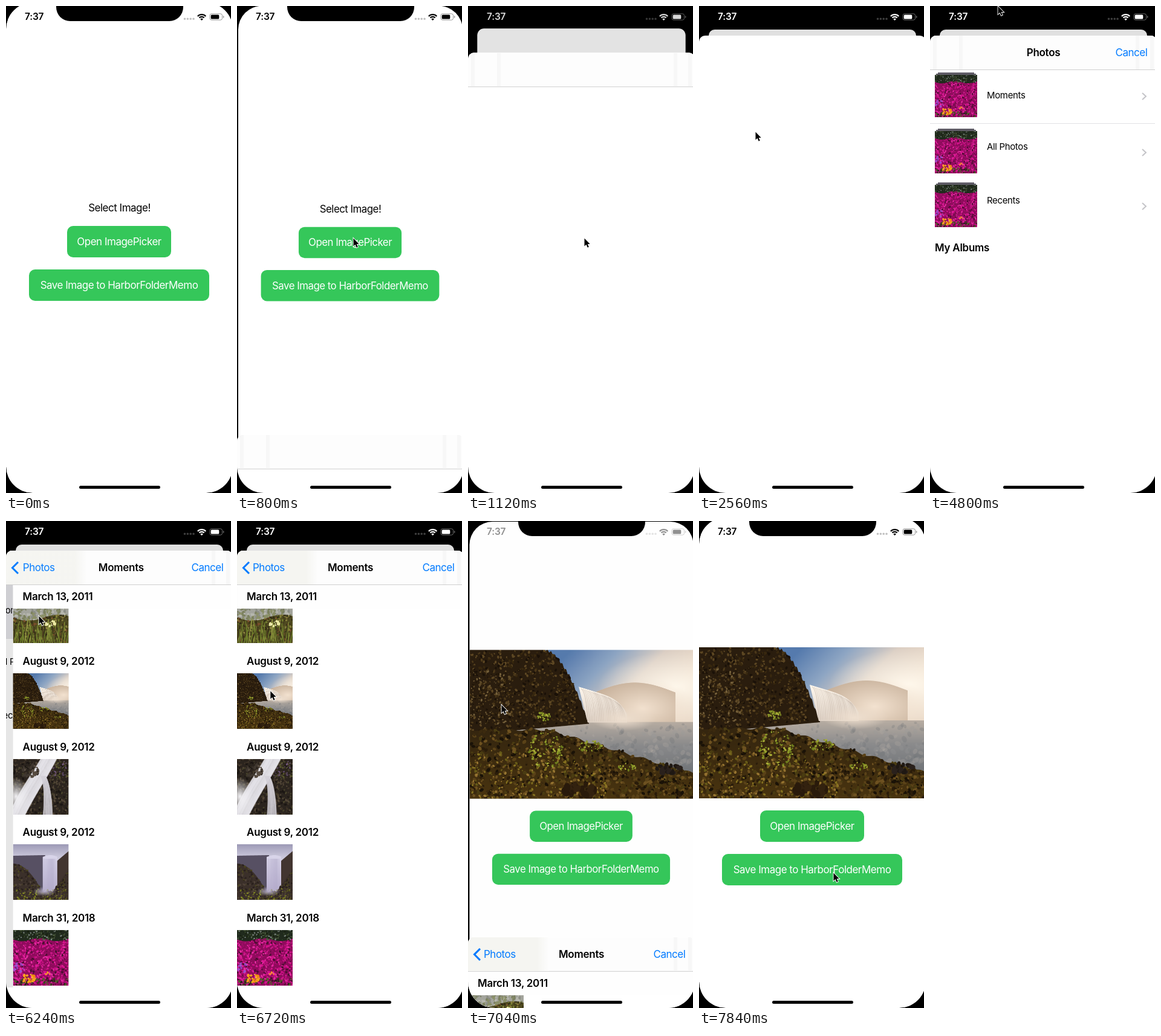
An HTML page with a canvas that plays this animation: 372x806 px, repeating every 8 s.

```html
<!DOCTYPE html>
<html lang="en">
<head>
<meta charset="utf-8">
<title>Image picker</title>
<style>
html, body { margin: 0; width: 100%; height: 100%; overflow: hidden; background: #000; }
body { position: relative; font: 17px/24px Inter, sans-serif; letter-spacing: -.5px; color: #000; }
div, svg, canvas { position: absolute; }
canvas { object-fit: cover; }
#screen { left: 0; top: -6px; width: 375px; height: 812px; border-radius: 44px; overflow: hidden; }
#stage { left: 0; top: 6px; width: 375px; height: 806px; }
#card { left: 0; top: -6px; width: 375px; height: 812px; background: #fff; overflow: hidden; transform-origin: 187.5px 529px; }
#cardDim, #rootDim { inset: 0; background: #000; }
#sheet { left: 0; top: 0; width: 375px; height: 812px; background: #fff; border-radius: 10px 10px 0 0; overflow: hidden; }
#nav { left: 0; top: 0; width: 375px; height: 55.5px; background: #fdfdfd; border-bottom: 1px solid #cfcfcf; overflow: hidden; }
.band { top: 0; width: 6px; height: 56px; background: #f7f7f7; }
#tint { left: 0; top: 0; width: 134px; height: 56px; background: linear-gradient(90deg, #f5f5f1 85%, #fdfdfd); }
#root, #moments { left: 0; top: 56px; width: 375px; background: #fff; }
#root { height: 667px; overflow: hidden; }
#moments { height: 710px; }
#rowHit { left: 0; top: 0; width: 375px; height: 89px; background: #e5e5ea; }
.rule { left: 0; top: 89px; width: 375px; height: 1px; background: #e2e2e4; }
.stack { height: 1.5px; background: #5f5c66; }
.sticky { left: 0; top: 0; width: 375px; height: 40px; background: #fefefe; }
.t { white-space: nowrap; height: 24px; }
.c { transform: translateX(-50%); }
.b { font-weight: 600; letter-spacing: -.27px; }
.s { font-size: 15px; letter-spacing: -.35px; }
.blue { color: #007aff; }
.btn { height: 52px; line-height: 52px; border-radius: 10px; background: #35c75a; color: #fff; text-align: center; white-space: nowrap; }
#time { left: 31px; top: 6px; font-weight: 600; font-size: 15.5px; letter-spacing: -.2px; }
#status, #notch, #cursor { left: 0; top: 0; overflow: visible; }
#notch { left: 83px; top: -25px; width: 209.5px; height: 50px; border-radius: 23px; background: #000; }
#home { left: 121px; top: 794px; width: 133.5px; height: 5px; border-radius: 3px; background: #000; }
</style>
</head>
<body>
<div id="screen"><div id="stage"></div></div>
<script>
const DURATION = 8000, STEP = 160, SHEET_TOP = 49, SHEET_TRAVEL = 757;
const PRESENT = 756, LOADED = 4800, PUSH = 5860, DISMISS = 6802;
const $ = id => document.getElementById(id);
const clamp = v => Math.min(1, Math.max(0, v));
const mix = (a, b, k) => a + (b - a) * k;
const ramp = (v, from, to) => clamp((v - from) / (to - from));
const times = (n, fn) => Array.from({ length: n }, (_, i) => fn(i));

// Photo painting: regions are bounded by functions of x
function painter(ctx, seed) {
  const rnd = () => (seed = seed * 16807 % 2147483647) / 2147483647;
  const asFn = v => typeof v === 'function' ? v : () => v;
  const p = {
    rnd,
    fade(colors, x0, y0, x1, y1) {
      const g = ctx.createLinearGradient(x0, y0, x1, y1);
      colors.forEach((c, i) => g.addColorStop(i / (colors.length - 1), c));
      return g;
    },
    area(x0, x1, top, bottom, fill) {
      ctx.fillStyle = fill;
      ctx.beginPath();
      for (let x = x0; x <= x1; x++) ctx.lineTo(x, asFn(top)(x));
      for (let x = x1; x >= x0; x--) ctx.lineTo(x, asFn(bottom)(x));
      ctx.fill();
    },
    dabs(count, x0, x1, top, bottom, size, colors) {
      for (let i = 0; i < count; i++) {
        const x = mix(x0, x1, rnd()), y = mix(asFn(top)(x), asFn(bottom)(x), rnd());
        const r = size * mix(.4, 1.2, rnd());
        ctx.fillStyle = colors[Math.floor(rnd() * colors.length)];
        ctx.beginPath();
        ctx.ellipse(x, y, r, r * .7, rnd() * 3, 0, 7);
        ctx.fill();
      }
    },
    cluster(count, cx, cy, rx, ry, size, colors) {
      const h = x => ry * Math.sqrt(Math.max(0, 1 - ((x - cx) / rx) ** 2));
      p.dabs(count, cx - rx, cx + rx, x => cy - h(x), x => cy + h(x), size, colors);
    },
    glow(x, y, rx, ry, color) {
      ctx.save();
      ctx.translate(x, y);
      ctx.scale(rx, ry);
      const g = ctx.createRadialGradient(0, 0, 0, 0, 0, 1);
      g.addColorStop(0, color);
      g.addColorStop(1, color + '00');
      ctx.fillStyle = g;
      ctx.fillRect(-1, -1, 2, 2);
      ctx.restore();
    },
    strands(count, color, curve) {
      ctx.strokeStyle = color;
      for (let i = 0; i < count; i++) {
        ctx.lineWidth = mix(.6, 2, rnd());
        ctx.beginPath();
        curve(i / count);
        ctx.stroke();
      }
    }
  };
  return p;
}

const leaf = ['#8d9929', '#6f7d1d', '#a7ac36'];
const scenes = {
  falls: { w: 375, h: 250, seed: 7, paint(c, p) {
    p.area(0, 375, 0, 250, p.fade(['#557aad', '#8da5c3', '#dccfc4', '#ecdccb'], 170, 0, 290, 120));
    p.glow(345, 62, 130, 60, '#fff8ec');
    p.area(208, 345, x => 72 - 17 * Math.sin((x - 208) / 44), 122, '#c8b29c');
    p.glow(290, 98, 90, 50, '#f3e2d0');
    p.area(0, 375, 121, 250, p.fade(['#b9aea3', '#8b8b8c', '#74777b'], 0, 120, 0, 200));
    p.dabs(180, 160, 375, 125, 195, 5, ['#9a9a9a44', '#6b6f7444', '#b3aca444']);
    const cliff = x => x < 125 ? 0 : 125 * ((x - 125) / 75) ** 1.8 + 2 * Math.sin(x);
    p.area(0, 200, cliff, x => 142 - x * .09, '#2a1d0e');
    p.dabs(900, 0, 180, cliff, x => 138 - x * .09, 2.4, ['#4a3719', '#38280f', '#1a1108', '#5d4723', '#2a1d0e']);
    p.dabs(160, 0, 70, 35, 125, 2, ['#75603a', '#5d4928', '#211608']);
    const crest = x => 62 + .3 * (x - 183) + 22 * ((x - 183) / 81) ** 6;
    p.area(183, 264, crest, x => Math.min(122, 62 + (x - 183) * 4), p.fade(['#fff8ee', '#dfd2c6'], 0, 62, 0, 122));
    p.strands(22, '#b8a99a66', k => {
      const x = 187 + 66 * k;
      c.moveTo(x, crest(x) + 2);
      c.quadraticCurveTo(x + 9, crest(x) + 8, x + 11, 120);
    });
    p.glow(258, 116, 55, 20, '#efe0d0');
    const shore = x => 134 + Math.max(0, x - 130) * .3 + 2 * Math.sin(x / 6);
    p.area(0, 375, shore, 250, p.fade(['#35260f', '#49340f'], 0, 140, 0, 250));
    p.dabs(1100, 0, 375, shore, 250, 3.4, ['#5a4218', '#2a1c0a', '#6d5120', '#3b2a0f', '#1a1207', '#4a3c12']);
    p.dabs(260, 0, 230, x => shore(x) + 35, 250, 2.4, ['#84701f', '#665a18', '#957330']);
    p.cluster(22, 333, 200, 20, 8, 6, ['#2a211c', '#1f1813']);
    p.cluster(26, 185, 236, 26, 12, 7, ['#33220f', '#291a0b']);
    p.cluster(80, 128, 168, 28, 30, 2.2, leaf);
    p.cluster(35, 125, 112, 11, 8, 2.3, leaf);
    p.cluster(40, 202, 162, 20, 10, 2, leaf);
    p.cluster(24, 264, 197, 14, 7, 2, leaf);
  } },
  flowers: { w: 70, h: 70, seed: 5, paint(c, p) {
    p.area(0, 70, 0, 70, '#8f0b5c');
    p.dabs(750, 0, 70, 12, 70, 1.5, ['#d8128e', '#c2107f', '#e62ba2', '#a00d68', '#4a0f30', '#dd1c98']);
    p.area(0, 70, 0, x => 12 + 2 * Math.sin(x / 7), '#202a1d');
    p.dabs(140, 0, 70, 0, 12, 1.2, ['#4b5a3f', '#848d8b', '#18200f', '#39472b']);
    p.dabs(70, 0, 70, 61, 70, 1.6, ['#39451d', '#29231b', '#55602b']);
    p.cluster(22, 7, 48, 7, 7, 1.5, ['#a252d2', '#8b40b8']);
    p.cluster(26, 20, 61, 8, 6, 2, ['#ffa51c', '#f08a10', '#ffc03a']);
    p.cluster(5, 43, 55, 3, 2, 1.5, ['#ffa51c']);
  } },
  grass: { w: 92, h: 92, seed: 11, paint(c, p) {
    p.area(0, 92, 0, 92, '#a3a49c');
    p.dabs(200, 0, 92, 30, 60, 3, ['#8c8e86', '#b6b7ae', '#7c8160', '#8b9068']);
    const turf = x => 50 + 5 * Math.sin(x / 16);
    p.area(0, 92, turf, 92, '#4f4a20');
    p.dabs(350, 0, 92, turf, 92, 1.8, ['#6f7a2c', '#3e3518', '#8c8440', '#2f2a16', '#7a4e2c']);
    for (const color of ['#8f9440', '#332b16', '#6b7a2a'])
      p.strands(24, color, k => {
        c.moveTo(92 * k, 92);
        c.lineTo(92 * k + mix(-7, 7, p.rnd()), mix(52, 80, p.rnd()));
      });
    p.cluster(18, 62, 60, 8, 5, 2.5, ['#eceaa4', '#f5f2c4']);
  } },
  stream: { w: 92, h: 92, seed: 14, paint(c, p) {
    p.area(0, 92, 0, 92, '#2b241e');
    p.dabs(500, 0, 92, 0, 92, 2.2, ['#3f3428', '#1b1613', '#524637', '#45402a']);
    p.dabs(70, 45, 92, 4, 32, 1.6, ['#765a83', '#5d4a66', '#5a5c2c']);
    p.strands(60, '#e8e6ecaa', k => {
      c.moveTo(46 + 26 * k, 0);
      c.bezierCurveTo(28 + 28 * k, 32, 30 * k + 14, 45, 26 * k - 6, 92);
    });
    p.strands(22, '#d5d2daaa', k => {
      c.moveTo(46 + 8 * k, 28);
      c.quadraticCurveTo(54 + 10 * k, 45, 50 + 16 * k, 92);
    });
    p.cluster(50, 29, 20, 13, 11, 3, ['#3f372f', '#574c41', '#2b241e']);
    p.glow(5, 62, 22, 32, '#f3f2f5');
  } },
  gorge: { w: 92, h: 92, seed: 16, paint(c, p) {
    p.area(0, 92, 0, 92, p.fade(['#9d9ab6', '#c9c6da', '#dcdae6'], 0, 0, 0, 40));
    p.area(0, 53, x => 19 - x * .02, 92, '#575063');
    p.area(70, 92, x => 30 - (x - 70) * .85, 92, '#423530');
    p.area(49, 73, x => 21 - Math.sin((x - 49) / 8) * 3, 78, p.fade(['#d9d5ea', '#bcb3d2'], 0, 20, 0, 78));
    p.strands(12, '#a79fc166', k => { c.moveTo(51 + 20 * k, 24); c.lineTo(50 + 22 * k, 76); });
    const bank = x => x < 48 ? 32 + x * x * .02 : 78 - Math.max(0, x - 66) * 1.4;
    p.area(0, 92, bank, 92, '#3b302a');
    p.dabs(400, 0, 92, bank, 92, 1.9, ['#4a4420', '#2a211d', '#4f4238', '#352b27']);
    p.dabs(60, 5, 92, 74, 92, 1.6, ['#717420', '#858b25']);
    p.glow(52, 78, 20, 8, '#b8b0cc');
  } }
};

// Markup helpers
const text = (x, cy, str, cls = '', id = '') =>
  `<div ${id && `id="${id}"`} class="t ${cls}" style="left:${x}px;top:${cy - 12}px">${str}</div>`;
const box = (cls, x, y, w, inner = '') =>
  `<div class="${cls}" style="left:${x}px;top:${y}px;width:${w}px">${inner}</div>`;
const photo = (name, x, y, w, h) =>
  `<canvas data-scene="${name}" style="left:${x}px;top:${y}px;width:${w}px;height:${h}px"></canvas>`;
const chevron = (x, cy, w, h, color, weight) =>
  `<svg style="left:${x}px;top:${cy - h / 2}px;overflow:visible" width="12" height="${h}"><path d="M0 0l${w} ${h / 2}l${-w} ${h / 2}" fill="none" stroke="${color}" stroke-width="${weight}"/></svg>`;

const albumRow = (name, y, labelY) =>
  box('stack', 13, y, 60) + box('stack', 10, y + 2, 66) + photo('flowers', 8, y + 4, 70, 70) +
  text(94, y + labelY, name, 's') + chevron(351, y + 39, 6, 11, '#c4c4c8', 2);

function section(scene, i) {
  const y = 5 + 141.75 * i;
  const date = i === 0 ? 'March 13, 2011' : i < 4 ? 'August 9, 2012' : 'March 31, 2018';
  return photo(scene, 0, y, 92, 92) +
    (i ? text(16, y - 20, date, 'b') : `<div class="sticky">${text(16, 20, date, 'b')}</div>`);
}

$('stage').innerHTML = `
<div id="card">
  ${text(187.5, 340, 'Select Image!', 'c', 'prompt')}
  <div id="picked">${photo('falls', 0, 215, 375, 250)}</div>
  <div id="buttons">
    ${box('btn', 101, 370, 172, 'Open ImagePicker')}
    ${box('btn', 38, 442, 298, 'Save Image to HarborFolderMemo')}
  </div>
  <div id="cardDim"></div>
</div>
<div id="sheet">
  <div id="root">
    <div id="rowHit"></div>
    <div class="rule"></div>
    ${albumRow('Moments', 5, 38)}
    ${albumRow('All Photos', 98, 30)}
    ${albumRow('Recents', 187, 30)}
    ${text(8, 295, 'My Albums', 'b')}
    <div id="rootDim"></div>
  </div>
  <div id="moments">${['grass', 'falls', 'stream', 'gorge', 'flowers'].map(section).join('')}</div>
  <div id="nav">
    ${[5, 48, 340, 364].map(x => `<div class="band" style="left:${x}px"></div>`).join('')}
    <div id="tint"></div>
    <div id="labels">
      ${text(187.5, 28, 'Photos', 'b c', 'rootTitle')}
      ${text(187.5, 28, 'Moments', 'b c', 'pageTitle')}
      <div id="back">${chevron(19.5, 28, -9.5, 19, '#007aff', 3)}</div>
      ${text(26, 28, 'Photos', 'blue', 'backLabel')}
      ${text(306.5, 28, 'Cancel', 'blue')}
    </div>
  </div>
</div>
<div id="notch"></div>
<div id="status">
  <div id="time">7:37</div>
  <svg width="375" height="30" fill="currentColor">
    ${times(4, i => `<circle cx="${295.5 + 4.85 * i}" cy="21.3" r="1.7" opacity=".25"/>`).join('')}
    <path d="M316.9 16.9a9.4 9.4 0 0 1 13.4 0M319.5 19.6a5.7 5.7 0 0 1 8.2 0" fill="none" stroke="currentColor" stroke-width="2.2"/>
    <path d="M321.3 21.8a3.2 3.2 0 0 1 4.6 0L323.6 24Z"/>
    <rect x="337" y="12.8" width="20.5" height="10.4" rx="3" fill="none" stroke="currentColor" opacity=".4"/>
    <rect x="338.7" y="14.4" width="13.6" height="7.2" rx="1.5"/>
    <path d="M359 16v4q1.5-.6 1.5-2t-1.5-2" opacity=".45"/>
  </svg>
</div>
<div id="home"></div>
<svg id="cursor" width="12" height="18"><path d="M.5 .5v13l3-2.7 2.2 4.9 2.1-.9-2.1-4.8h4Z" stroke="#fff" stroke-width="1.8" paint-order="stroke"/></svg>`;

for (const canvas of document.querySelectorAll('canvas')) {
  const { w, h, seed, paint } = scenes[canvas.dataset.scene];
  canvas.width = w * 2;
  canvas.height = h * 2;
  const ctx = canvas.getContext('2d');
  ctx.scale(2, 2);
  paint(ctx, painter(ctx, seed));
}

// Pointer glides: start time, x, y, length
const GLIDE = 640;
const glides = [
  [160, 192, 384], [1440, 93, 208], [LOADED - STEP, 112, 0, STEP],
  [LOADED, 54, 157], [6240, 55, 304], [7040, 222, 582]
];

function pointerAt(t) {
  let x = 372, y = 700;
  for (const [start, toX, toY, length = GLIDE] of glides) {
    const k = ramp(t, start, start + length), e = k * k * (3 - 2 * k);
    x = mix(x, toX, e);
    y = mix(y, toY, e);
  }
  return [x, y];
}

// Critically damped spring: 0 before start, settling at 1
function spring(t, start) {
  const u = Math.max(0, t - start) * .014;
  return 1 - (1 + u) * Math.exp(-u);
}

const show = (id, on) => { $(id).style.opacity = +on; };
const move = (id, x, y = 0) => { $(id).style.transform = `translate(${x}px,${y}px)`; };
const slideTitle = (id, dx) => { $(id).style.transform = `translateX(calc(-50% + ${dx}px))`; };

function render(t) {
  const open = spring(t, PRESENT) - spring(t, DISMISS);
  const push = spring(t, PUSH), rest = 1 - push;
  const hasImage = t >= DISMISS, loaded = t >= LOADED;

  $('card').style.transform = `scale(${mix(1, .915, open)})`;
  $('card').style.borderRadius = mix(44, 11, open) + 'px';
  show('cardDim', .12 * open * open);
  show('prompt', !hasImage);
  show('picked', hasImage);
  move('buttons', 0, hasImage ? 115 : 0);

  move('sheet', 0, SHEET_TOP + SHEET_TRAVEL * (1 - open));
  show('nav', t < 2560 || loaded);
  show('labels', loaded);
  show('root', loaded);
  show('rowHit', t >= PUSH - STEP);
  show('rootDim', .1 * push);
  move('root', -112 * push);
  move('moments', 375 * rest);
  show('moments', push > 0);

  slideTitle('rootTitle', -130 * push);
  slideTitle('pageTitle', 90 * rest);
  move('backLabel', 60 * rest);
  show('rootTitle', ramp(rest, .1, 1));
  for (const id of ['pageTitle', 'backLabel', 'back', 'tint']) show(id, push);

  const light = 255 * (ramp(t, 800, 1176) - ramp(t, 6840, 7300));
  $('status').style.color = `rgb(${light},${light},${light})`;
  move('cursor', ...pointerAt(t));
  show('cursor', t >= STEP);
}

const begin = performance.now();
function tick() {
  const t = (performance.now() - begin) % DURATION;
  render(Math.floor(t / STEP) * STEP);
  requestAnimationFrame(tick);
}
tick();
</script>
</body>
</html>
```
